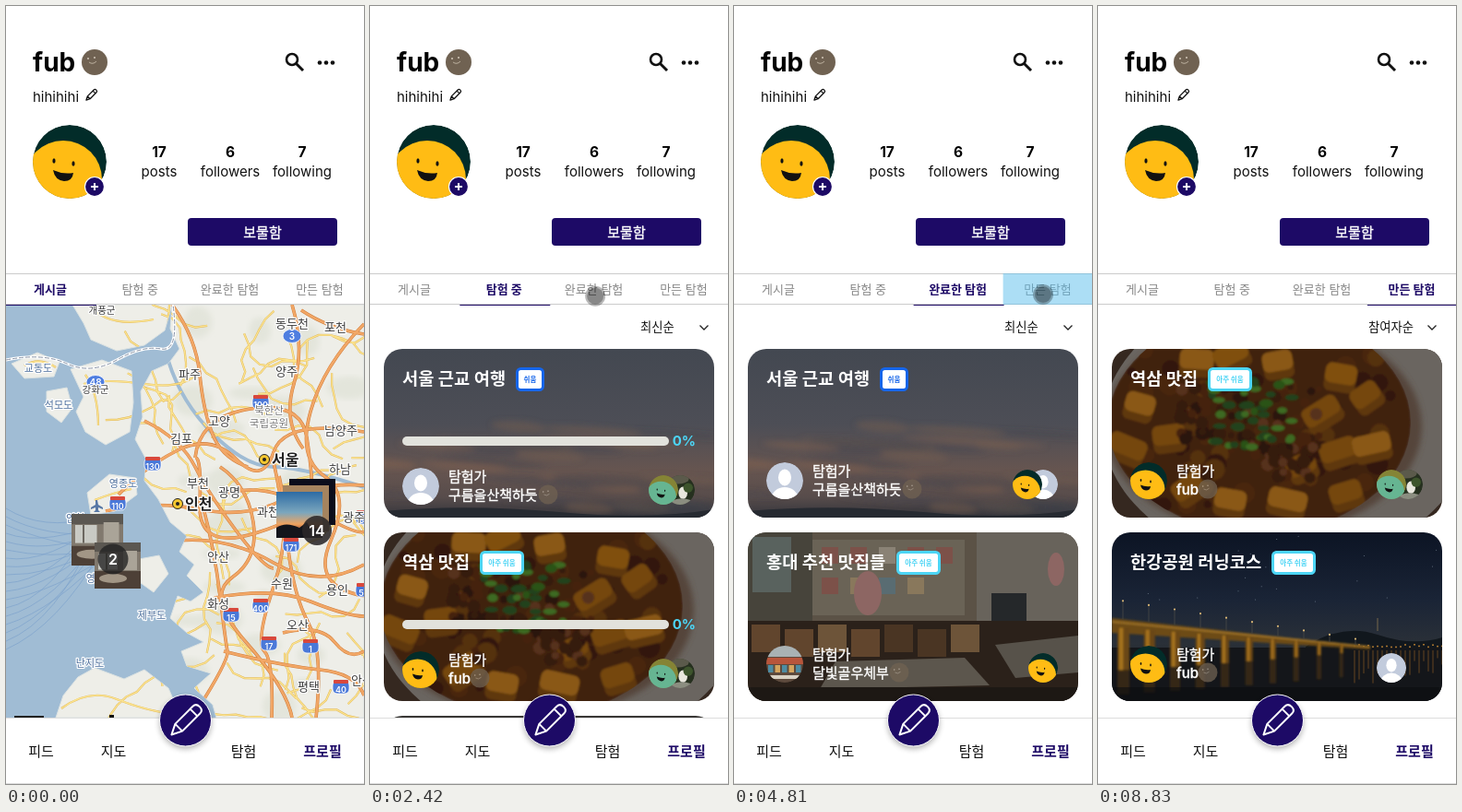
An HTML page that plays this animation: 388 by 844 pixels, repeating every 8.89 s.

```html
<!DOCTYPE html>
<html lang="ko">
<head>
<meta charset="utf-8">
<title>프로필</title>
<style>
html, body { margin: 0; width: 100%; height: 100%; overflow: hidden; background: #fff; }
svg { display: block; font-family: Inter, 'Noto Sans CJK KR', 'Noto Sans CJK', sans-serif; }
.halo text { paint-order: stroke; stroke: #fff; stroke-width: 2.5px; stroke-linejoin: round; }
</style>
</head>
<body>
<svg id="stage" width="388" height="844" viewBox="0 0 388 844"></svg>
<script>
const LOOP = 8890, NAVY = '#1d0a66', CYAN = '#4cd5f5', BLUE = '#1565ea', SEA = '#a0bcd4';
let seed = 7;
const rnd = (a = 0, b = 1) => {
  seed = (seed * 16807) % 2147483647;
  return a + (b - a) * seed / 2147483647;
};
const many = (n, f) => Array.from({ length: n }, (_, i) => f(i)).join('');
const pick = list => list[Math.floor(rnd(0, list.length))];

// Markup helpers
const rect = (x, y, w, h, fill, o = '') => `<rect x="${x}" y="${y}" width="${w}" height="${h}" fill="${fill}" ${o}/>`;
const oval = (x, y, rx, ry, fill, o = '') => `<ellipse cx="${x}" cy="${y}" rx="${rx}" ry="${ry}" fill="${fill}" ${o}/>`;
const disc = (x, y, r, fill, o) => oval(x, y, r, r, fill, o);
const shape = (d, fill, o = '') => `<path d="${d}" fill="${fill}" ${o}/>`;
const line = (d, stroke, w, o = '') => `<path d="${d}" fill="none" stroke="${stroke}" stroke-width="${w}" ${o}/>`;
// A hairline stroke gives hangul its missing medium weight
const text = (s, x, y, size, fill, weight = 400, anchor = 'start', o = '') =>
  `<text x="${x}" y="${y}" font-size="${size}" fill="${fill}" font-weight="${weight}" text-anchor="${anchor}" ${
    weight === 500 ? `stroke="${fill}" stroke-width=".35"` : ''} ${o}>${s}</text>`;
const mid = (s, x, y, size, fill, weight, o) => text(s, x, y, size, fill, weight, 'middle', o);
const place = (id, x, y, k = 1) => `<use href="#${id}" transform="translate(${x} ${y}) scale(${k})"/>`;
const fade = (id, ...stops) => `<linearGradient id="${id}" x2="0" y2="1">${stops.map(([at, c]) =>
  `<stop offset="${at}" stop-color="${c}"/>`).join('')}</linearGradient>`;
const blur = (id, r) => `<filter id="${id}"><feGaussianBlur stdDeviation="${r}"/></filter>`;
const group = (id, body, o = '') => `<g id="${id}" ${o}>${body}</g>`;

// Avatars, 80 px wide around the origin
const face = (back, skin) => disc(0, 0, 40, back) + disc(-7, 19, 42, skin) +
  oval(-17, -1, 1.6, 2.8, '#111') + oval(4, 2, 1.6, 2.8, '#111') +
  shape('M-18 9Q-7 14 4 12Q3 21-6 21Q-16 20-18 9Z', '#111');
const round = 'clip-path="url(#round)"';
const avatars =
  group('me', face('#022c29', '#ffbc14'), round) +
  group('green', face('#858435', '#66b592'), round) +
  group('anon', disc(0, 0, 40, '#c2cbdc') + oval(0, -7, 14, 18, '#fff') + oval(0, 39, 29, 25, '#fff'), round) +
  group('leaf', disc(0, 0, 40, '#26301f') + oval(-8, -30, 32, 14, '#5b5a4b') + oval(8, 8, 12, 17, '#e9e7de') +
    oval(5, 36, 30, 13, '#8b8d80') + disc(22, -6, 13, '#3d542c'), round) +
  group('shop', disc(0, 0, 40, '#5d4a3d') + rect(-40, -40, 80, 24, '#a9b2b4') + rect(-40, -14, 80, 14, '#b8553b') +
    many(5, i => rect(-36 + i * 15, 2, 11, 16, i % 2 ? '#d6a55d' : '#4e8ca3')) + rect(-40, 24, 80, 8, '#d9d2c4'), round) +
  group('emo', disc(0, 0, 14, '#706252') + disc(-7, -4, .9, '#ddd3c4') + disc(0, -5, .9, '#ddd3c4') +
    line('M-6 0Q-2 3 2-1', '#cfc3b2', .8));

// Card pictures, 358 x 183
const sunset = rect(0, 0, 358, 183, 'url(#dusk)') + '<g filter="url(#soft)">' +
  many(26, () => oval(rnd(0, 358), rnd(70, 178), rnd(25, 85), rnd(2, 6), pick(['#79604f', '#8a6650', '#46454e', '#3c4049']),
    'opacity=".45" transform="rotate(4 179 90)"')) + '</g>' + shape('M0 176Q90 168 190 177T358 174V183H0Z', '#262a31');

const tofu = [[30, 62], [92, 14], [130, 8], [180, 16], [248, 30], [276, 52], [228, 70], [62, 96], [86, 150], [128, 166], [206, 128], [246, 112],
  [282, 106], [254, 158], [190, 166], [16, 108]];
const food = rect(0, 0, 358, 183, '#352820') + oval(190, 84, 200, 150, '#6a6560') + oval(164, 84, 172, 118, '#55453a', 'filter="url(#soft)"') +
  '<g clip-path="url(#bowl)" filter="url(#haze)">' + oval(160, 80, 164, 120, '#40210d') +
  many(70, () => disc(rnd(10, 315), rnd(0, 183), rnd(4, 12), pick(['#30180c', '#55300f', '#4a270e']))) +
  tofu.map(([x, y]) => {
    const w = rnd(32, 44), spin = `rx="7" transform="rotate(${rnd(-35, 35)} ${x} ${y})"`;
    return rect(x - w / 2, y - 13, w, 30, '#5f380e', spin) + rect(x - w / 2, y - 14, w, 22, pick(['#80500f', '#8a5814', '#74470f']), spin);
  }).join('') +
  many(110, () => disc(rnd(75, 225), rnd(40, 140), rnd(3, 8), pick(['#2a140b', '#45200f', '#351a0e', '#57301a']))) +
  many(46, () => oval(rnd(108, 196), rnd(34, 108), rnd(4, 8), rnd(3, 5), pick(['#2c5218', '#3d6a24', '#21421a']))) +
  '</g>';

const room = rect(0, 0, 358, 183, '#5b5246') + rect(0, 0, 70, 96, '#47443b') + rect(5, 5, 42, 60, '#59625e') +
  rect(70, 8, 165, 82, '#6a6356') + rect(248, 0, 110, 120, '#68635b') + rect(264, 66, 38, 34, '#25282a') +
  many(9, i => rect(80 + i % 5 * 31, 16 + (i > 4) * 33, 18, 18, pick(['#8a8275', '#7c5149', '#596c72', '#89785c']))) +
  oval(130, 66, 15, 24, '#8d6663') + oval(334, 40, 9, 18, '#8d6663') + rect(0, 96, 358, 87, '#2b211a') +
  many(7, i => rect(4 + i * 36, 100 + i % 2 * 5, 31, 30, pick(['#61452d', '#4a3523', '#6d5439']))) +
  shape('M95 140L235 136L262 166L78 170Z', '#5c564d') + shape('M268 122L358 112V152L290 158Z', '#57524a') +
  rect(0, 168, 358, 15, '#1d1814');

const deck = x => 93 + x * .11;
const bridge = rect(0, 0, 358, 183, 'url(#night)') +
  many(24, () => disc(rnd(0, 358), rnd(4, 80), .5, '#6f7b8c')) +
  shape('M210 124Q250 98 288 111T358 114V130H210Z', '#11171d') + rect(287.5, 93, 1, 14, '#77694d') +
  rect(0, 125, 358, 58, '#14161a') +
  many(20, i => rect(262 + i * 5, 121 + rnd(0, 3), 2, 1.5, '#a8742f') + rect(262 + i * 5, 128, 2, rnd(8, 36), '#6d4b22', 'opacity=".45"')) +
  '<g filter="url(#haze)">' + shape('M0 93L280 124V127L0 109Z', '#6d4c18') + line('M0 97L280 124', '#a5772a', 1.6) +
  many(10, i => {
    const x = 6 + i * 29 - i * i * .25, w = 13 - i, y = deck(x) + 10 - i, h = 46 - i * 4;
    return rect(x, y, w, h, '#6a4616') + rect(x + 2, y, w / 3, h, '#a5721f') + rect(x, y + h, w, 26, '#4d3412', 'opacity=".6"');
  }) + '</g>' +
  many(10, i => {
    const x = 12 + i * 28, top = deck(x) - 20 + i * 1.5;
    return line(`M${x} ${deck(x)}V${top}`, '#4b4b48', .8) + disc(x, top, 1.1, '#d9b674');
  }) + rect(0, 168, 358, 15, '#0b0d10', 'opacity=".6"');

// Map
const land = 'M180 324L178 350L188 372L176 388L158 396L146 418L148 446L140 470L152 492L150 515L165 535L178 560L196 575L188 592L204 606L196 618' +
  'L214 636L200 646L186 640L178 664L196 680L214 690L190 700L196 716L222 724L204 740L224 758L228 772H388V324Z' +
  'M72 324H180L172 352L150 368L120 374L92 362L84 344ZM54 772L62 748L78 728L96 718L128 730L150 720L176 740L190 772Z';
const isles = 'M70 394L104 384L136 396L138 430L134 462L108 476L86 462L76 440L84 424ZM6 388L34 376L58 386L52 402L20 404Z' +
  'M44 418L66 414L72 436L60 452L44 440ZM88 528L112 508L140 512L142 530L118 548L92 552ZM144 600L166 596L176 616L160 636L146 626Z';
const roads = ['M205 490Q210 445 265 437T326 468T332 530T270 572T210 540T205 490', 'M290 495Q300 540 306 590T328 670T336 772',
  'M214 545Q226 590 232 640T240 700T202 772', 'M180 324Q206 360 210 400T224 465T262 500', 'M108 548Q160 536 210 546T300 536T388 520',
  'M122 530Q150 500 186 482T250 492T290 484T388 462', 'M186 580Q240 575 290 604T388 606', 'M226 642Q290 630 330 646T388 662',
  'M310 324Q324 370 312 410T322 480', 'M388 345Q344 390 330 440T345 510T352 580T388 640', 'M236 700Q300 716 340 720T388 748',
  'M296 510Q310 570 290 630T280 700T288 772', 'M150 450Q190 470 205 500T250 570T290 610', 'M232 500Q262 520 268 560T245 620T260 690T310 772',
  'M320 330Q350 350 388 356', 'M300 680Q340 670 356 690T388 700', 'M232 530Q280 515 330 545T388 570'];
const walk = () => {
  let x = rnd(150, 388), y = rnd(330, 770), a = rnd(0, 6.3), d = `M${x} ${y}`;
  for (let i = 0; i < 7; i++) {
    a += rnd(-.7, .7);
    d += `L${x += 13 * Math.cos(a)} ${y += 13 * Math.sin(a)}`;
  }
  return d;
};
const lanes = many(62, walk) + 'M60 762Q90 740 120 752T180 768M86 400Q100 420 100 455M96 536Q116 528 136 524M90 324Q110 350 160 340' +
  'M20 390Q36 380 54 392M84 410Q108 404 150 410T208 398';
const shield = (s, x, y) => rect(x - 9, y - 7, 18, 14, '#4a78d8', 'rx="5" stroke="#fff" stroke-width=".8"') +
  rect(x - 8, y - 8, 16, 4, '#d8483c', 'rx="1"') + mid(s, x, y + 6, 9, '#fff', 600);
const route = (s, x, y) => oval(x, y, 10, 7.5, '#4f7ee0', 'stroke="#fff" stroke-width=".8"') + mid(s, x, y + 3.5, 10, '#fff', 600);
const towns = [['동두천', 310, 344], ['포천', 357, 348], ['양주', 304, 396], ['파주', 199, 399], ['고양', 231, 450], ['김포', 190, 469],
  ['남양주', 363, 460], ['부천', 208, 517], ['광명', 242, 527], ['하남', 362, 502], ['과천', 284, 548], ['광주', 377, 554], ['안산', 230, 597],
  ['수원', 299, 626], ['용인', 359, 633], ['화성', 230, 648], ['오산', 316, 671], ['평택', 328, 738], ['안성', 386, 731], ['강화군', 97, 415, 10.5],
  ['개풍군', 104, 329, 10.5]];
const islands = [['교동도', 35, 393], ['석모도', 57, 433], ['영종도', 127, 518], ['제부도', 158, 661], ['난지도', 91, 713], ['인천', 75, 556], ['영흥도', 102, 621]];
const city = (s, x, y) => disc(x, y, 5.5, '#f7c830', 'stroke="#222" stroke-width="1"') + disc(x, y, 2, '#222') +
  text(s, x + 8, y + 6, 16, '#222', 600);
const interior = (x, y, w) => rect(x, y, w, w, '#81796e') + rect(x, y, w, w * .2, '#5b5751') + rect(x + 4, y + 12, w * .42, w * .35, '#c9cac4') +
  line(`M${x + 13} ${y + 12}v${w * .35}`, '#4d463f', 1.5) + rect(x + w * .62, y + 9, w * .3, w * .42, '#aaa498') +
  rect(x, y + w * .62, w, w * .38, '#4d4037') + oval(x + w * .4, y + w * .78, w * .3, 5, '#a29686');
const border = 'M0 384Q40 376 66 388T120 384T168 372T181 324';
const map = rect(0, 324, 388, 448, SEA) +
  many(18, i => line(`M${95 + i % 4 * 8} ${555 + i % 3 * 18}Q${40 + i} ${570 + i * 6} 0 ${545 + i * 9}`, '#7da3cc', .7)) +
  shape(land + isles, '#eeeee8', 'stroke="#dbe2e2"') +
  '<g clip-path="url(#land)">' +
  many(26, () => oval(rnd(170, 388), rnd(330, 770), rnd(8, 28), rnd(6, 18), '#e3e5db', 'filter="url(#soft)"')) +
  line('M176 385Q190 430 225 465T290 500T388 522', SEA, 4) + line(lanes, '#dfb559', 2.2) + line(lanes, '#fbe38e', 1.4) +
  line(roads.join(''), '#cf7d3c', 3.6) + line(roads.join(''), '#f2a766', 2.6) + '</g>' +
  line(border, '#fff', 3) + line(border, '#8a94a6', 1, 'stroke-dasharray="5 2"') +
  route('3', 310, 358) + route('48', 97, 408) +
  [['100', 276, 430], ['130', 159, 497], ['110', 121, 540], ['171', 309, 585], ['400', 276, 651], ['15', 244, 661], ['17', 285, 692], ['1', 330, 695],
    ['40', 363, 739], ['35', 388, 555], ['50', 388, 634]].map(a => shield(...a)).join('') +
  shape('M97 536l2 0 1 5 5 3v2l-5-2v3l2 2h-7l2-2v-3l-5 2v-2l5-3z', '#5878a5') +
  '<g class="halo">' + towns.map(([s, x, y, size = 13]) => mid(s, x, y + 4.5, size, '#3b3b3b', 400)).join('') +
  islands.map(([s, x, y]) => mid(s, x, y + 4, 11, '#4b6d9b', 400)).join('') +
  mid('북한산', 285, 443, 11.5, '#777') + mid('국립공원', 285, 457, 11.5, '#777') +
  city('서울', 280, 492) + city('인천', 186, 540) + '</g>' +
  rect(112, 769, 5, 5, '#111') + rect(9, 770, 32, 2, '#222') +
  interior(71, 551, 56) + interior(96, 582, 50) + disc(116, 600, 16.5, '#222', 'opacity=".78"') + mid('2', 116, 606, 16, '#fff', 600) +
  rect(307, 513, 50, 50, '#0b0d1b') + rect(300, 520, 50, 50, '#a5845f') + rect(293, 527, 50, 50, 'url(#eve)') +
  shape('M293 566Q303 559 318 566L326 560L330 567H343V577H293Z', '#14151b') +
  disc(337, 569, 16, '#2a2728', 'opacity=".88"') + mid('14', 337, 575, 16, '#fff', 600);

// Cards
const bar = (w, id) => rect(20, 95, w, 10, '#e2e2dc', `rx="5" id="${id}"`);
function card(y, photo, title, badgeX, easy, who, name, nameEnd, friends, id) {
  const low = id ? 6 : 0, w = easy ? 31 : 48, c = easy ? BLUE : CYAN;
  return `<g transform="translate(15 ${y})"><g clip-path="url(#card)"><use href="#${photo}"/></g>` +
    text(title, 20, 39, 18.72, '#fff', 700) +
    rect(badgeX + 1.5, 21.5, w - 3, 23, '#fff', `rx="4" stroke="${c}" stroke-width="3"`) +
    mid(easy ? '쉬움' : '아주 쉬움', badgeX + w / 2, 36, 7.5, c, 700) +
    (id ? bar(289, id + 'Bar') + (id === 'a' ? rect(20, 95, 0, 10, CYAN, 'rx="5" id="fill"') : '') +
      text('0%', 338, 105, 15, CYAN, 700, 'end', `id="${id}Pct"`) : '') +
    `<g transform="translate(0 ${low})">` + place(who, 40, 143, .5) + text('탐험가', 70, 138, 15, '#fff', 500) +
    text(name, 70, 158, 15, '#fff', 500) + `<g opacity=".75">${place('emo', nameEnd + 11, 152, .75)}</g>` +
    friends.map(([f, x]) => place(f, x, 147, .4)).join('') + '</g></g>';
}
const ME = 'fub', WALK = '구름을산책하듯', POST = '달빛골우체부';
const pair = [['leaf', 321], ['green', 303]];
const hill = (y, id) => card(y, 'sunset', '서울 근교 여행', 143, true, 'anon', WALK, 167, id ? pair : [['anon', 320], ['me', 303]], id);
const meal = (y, id) => card(y, 'food', '역삼 맛집', 104, false, 'me', ME, 93, pair, id);
const river = y => card(y, 'bridge', '한강공원 러닝코스', 173, false, 'me', ME, 93, [['anon', 303]]);
const empty = rect(15, 372, 358, 183, '#808080', 'rx="20"') + mid('탐험을 완료하고 보물을 수집하세요!', 194, 449, 15.3, '#fff', 700) +
  disc(194, 479, 14, 'none', 'stroke="#fff" stroke-width="2"') + line('M194 472v14M187 479h14', '#fff', 2);
const views = [
  map,
  hill(372, 'a') + meal(571, 'b') + rect(15, 770, 358, 60, '#3a3836', 'rx="20"'),
  empty,
  hill(372) + card(571, 'room', '홍대 추천 맛집들', 161, false, 'shop', POST, 153, [['me', 320]]),
  river(372) + meal(571),
  meal(372) + river(571)
];

// Page chrome
const pencil = (x, y, k, color, w) => `<g transform="translate(${x} ${y}) rotate(45) scale(${k})">` +
  line('M-5.5-16q0-5 5.5-5t5.5 5V11L0 22L-5.5 11ZM-5.5-12H5.5M-5.5 11H5.5', color, w, 'stroke-linejoin="round"') + '</g>';
const stat = (x, n, s) => mid(n, x, 164, 15.5, '#000', 700) + mid(s, x, 185, 15, '#111');
const header = rect(0, 0, 388, 324, '#fff') + text(ME, 29, 71, 28, '#000', 700) + place('emo', 96, 61) +
  text('hihihihi', 29, 104, 15, '#111') + pencil(92.5, 96.5, .36, '#111', 3.6) +
  disc(310, 58, 6, 'none', 'stroke="#111" stroke-width="2.6"') + line('M314.5 62.5L322 70', '#111', 3) +
  many(3, i => disc(340 + i * 7, 61.5, 2.3, '#111')) +
  place('me', 69, 169) + disc(96, 196, 10.5, NAVY, 'stroke="#fff" stroke-width="1.2"') + line('M96 192v8M92 196h8', '#fff', 2) +
  stat(166, 17, 'posts') + stat(243, 6, 'followers') + stat(321, 7, 'following') +
  rect(197, 230, 162, 30, NAVY, 'rx="4"') + mid('보물함', 278, 250.5, 15, '#fff', 500) +
  rect(0, 290, 388, 1, '#ccc') + rect(0, 323, 388, 1, '#ccc') +
  ['게시글', '탐험 중', '완료한 탐험', '만든 탐험'].map((s, i) => mid(s, 48 + i * 97.3, 311.5, 13, '#888', 400, 'class="tab"')).join('') +
  rect(0, 324, 98, 1, NAVY, 'id="ink"') + rect(0, 290, 98, 34, '#5abeeb', 'id="tap" opacity="0"');
const navbar = rect(0, 772, 388, 72, '#fff') + rect(0, 772, 388, 1, '#ddd') + rect(0, 843, 388, 1, '#ddd') +
  [['피드', 38], ['지도', 116.5], ['탐험', 257.5]].map(([s, x]) => mid(s, x, 813.5, 15, '#111')).join('') +
  mid('프로필', 343, 813.5, 15, NAVY, 700) +
  disc(194.5, 778, 28, '#000', 'opacity=".3" filter="url(#soft)"') + disc(194.5, 775, 28, NAVY, 'stroke="#fff"') + pencil(195, 775, 1, '#fff', 2);
const sorter = group('sorter', rect(0, 325, 388, 46, '#fff') + text('최신순', 293, 353, 13.33, '#111', 400, 'start', 'id="order"') +
  line('M357.5 346.5l4.5 4.5 4.5-4.5', '#222', 1.3) + rect(0, 0, 0, 0, 'none', 'id="ring" rx="3" stroke="#d99a0b" stroke-width="2"'));
const popup = group('popup', rect(276.5, 358.5, 97, 138, '#fff', 'stroke="#888"') + rect(277, 359, 96, 27, '#1967d2') +
  ['최신순', '참여자순', '좋아요순', '난이도순', '진행률순'].map((s, i) => text(s, 293, 377 + i * 27.5, 13.33, i ? '#111' : '#fff')).join(''));

document.getElementById('stage').innerHTML = '<defs>' +
  '<clipPath id="round"><circle r="40"/></clipPath><clipPath id="card"><rect width="358" height="183" rx="20"/></clipPath>' +
  '<clipPath id="bowl"><ellipse cx="160" cy="80" rx="164" ry="120"/></clipPath>' +
  `<clipPath id="land"><path d="${land + isles}"/></clipPath>` + blur('soft', 3) + blur('haze', 1.2) +
  fade('dusk', [0, '#434851'], [.45, '#4d4e56'], [.72, '#665550'], [.88, '#574c4b'], [1, '#33343b']) +
  fade('night', [0, '#0c1424'], [.4, '#1a2436'], [.66, '#2a3038'], [1, '#14161a']) +
  fade('eve', [0, '#2c6ba4'], [.45, '#7ba6bd'], [.7, '#efa35f'], [.85, '#a04f31'], [1, '#17171c']) +
  avatars + group('sunset', sunset) + group('food', food) + group('room', room) + group('bridge', bridge) + '</defs>' +
  views.map(v => `<g class="view">${v}</g>`).join('') + sorter + header + navbar + popup +
  group('touch', disc(0, 0, 11, '#000', 'opacity=".28"') + disc(0, 0, 9, '#000', 'opacity=".26"'));

// Motion
const $ = id => document.getElementById(id);
const set = (el, attrs) => { for (const k in attrs) el.setAttribute(k, attrs[k]); };
const show = (el, on) => { el.style.display = on ? '' : 'none'; };
const ease = p => { p = Math.min(1, Math.max(0, p)); return p * p * (3 - 2 * p); };
const after = (t, marks) => marks.filter(m => t >= m).length;
const tabs = document.querySelectorAll('.tab'), panes = document.querySelectorAll('.view');
const taps = [1670, 3110, 4740];
const path = [[580, 361, 856], [1200, 134, 314], [1410, 148, 312], [2140, 148, 312], [2490, 255, 315], [3780, 255, 315], [4070, 335, 313],
  [5300, 335, 313], [5680, 349, 349], [6100, 349, 349], [6480, 338, 404], [7780, 338, 404], [8350, 402, 826]];

function touchAt(t) {
  const i = path.findIndex(p => p[0] > t);
  if (i < 1) return null;
  const [a, b] = [path[i - 1], path[i]], p = ease((t - a[0]) / (b[0] - a[0]));
  return [a[1] + (b[1] - a[1]) * p, a[2] + (b[2] - a[2]) * p];
}

function draw(now) {
  const t = now % LOOP;
  const view = after(t, [1740, 3180, 3300, 4820, 7010]), active = after(t, [1740, 3180, 4820]);
  panes.forEach((p, i) => show(p, i === view));
  tabs.forEach((el, i) => set(el, i === active ? { fill: NAVY, 'font-weight': 700 } : { fill: '#888', 'font-weight': 400 }));
  $('ink').setAttribute('x', taps.reduce((x, c) => x + 97.3 * ease((t - c - 160) / 240), 0));

  const n = after(t, taps), since = t - taps[n - 1];
  set($('tap'), { x: n * 97.3 - .3, opacity: n ? .5 * (1 - ease((since - 180) / 120)) : 0 });

  const ten = t >= 2490;
  $('aPct').textContent = ten ? '10%' : '0%';
  $('aBar').setAttribute('width', ten ? 281 : 289);
  $('fill').setAttribute('width', 29 * ease((t - 2560) / 350));

  show($('sorter'), view > 0);
  $('order').textContent = view === 5 ? '참여자순' : '최신순';
  const out = 3 * (1 - ease((t - 5940) / 160));
  set($('ring'), { x: 277 - out, y: 341 - out, width: 96 + 2 * out, height: 15 + 2 * out });
  show($('ring'), t >= 5940 && t < 8830);
  show($('popup'), t >= 6000 && t < 6950);

  const at = touchAt(t);
  show($('touch'), at);
  if (at) $('touch').setAttribute('transform', `translate(${at})`);
  requestAnimationFrame(draw);
}
draw(0);
</script>
</body>
</html>
```
